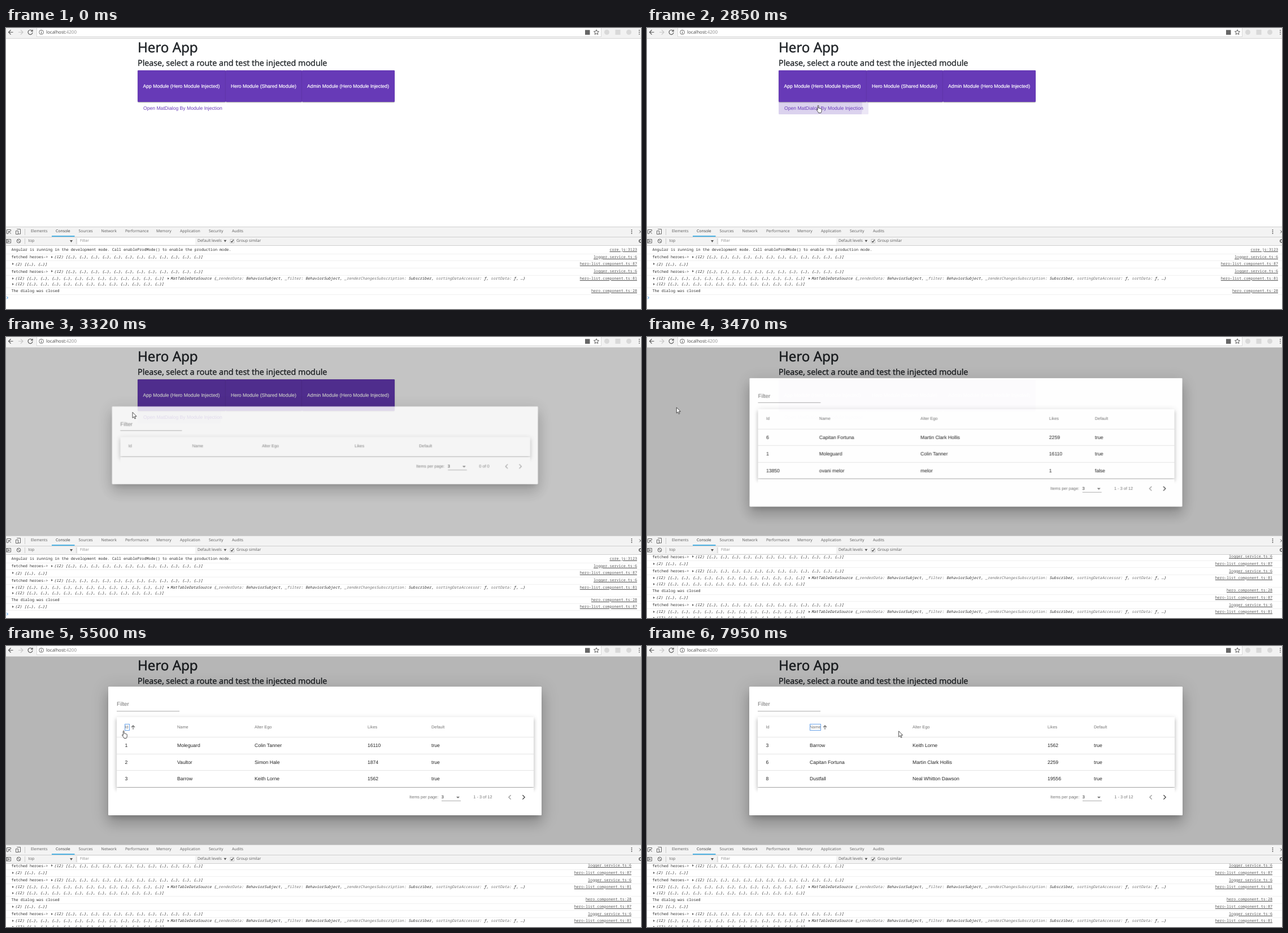
Recreate the animation shown at these times as an HTML page. Size 1124 px wide and 498 px high, loop 8000 ms.

```html
<!DOCTYPE html>
<html lang="en">
<head>
<meta charset="utf-8">
<title>Hero App</title>
<style>
  html, body { margin: 0; width: 100%; height: 100%; overflow: hidden; background: #fff; }
  #stage { position: relative; width: 1124px; height: 498px; overflow: hidden; --t: 0;
    font-family: "Liberation Sans", Arial, sans-serif; text-rendering: geometricPrecision; }
  #stage div, #stage svg { position: absolute; }
  .txt { white-space: pre; line-height: 20px; margin-top: -10px; }
  .ui { font-family: "Open Sans", "Noto Sans", sans-serif; font-size: 6.85px; color: #5a5a5a; }
  .url { font-family: "Open Sans", "Noto Sans", sans-serif; font-size: 8px; color: #444; }
  .h1, .h3 { font-family: "Open Sans", "Noto Sans", sans-serif; color: #212529; }
  .h1 { font-size: 24.2px; -webkit-text-stroke: .6px #212529; }
  .h3 { font-size: 14.33px; -webkit-text-stroke: .38px #212529; }
  .chrome { left: 0; top: 0; width: 1124px; height: 18px; background: #f2f2f2; border-bottom: 1px solid #d4d4d4; }
  .address { left: 54px; top: 0; width: 998px; height: 15px; background: #fff; border: solid #d8d8d8; border-width: 0 1px 1px; }

  #page { left: 0; top: 19px; width: 1124px; height: 333px; overflow: hidden; background: #fff; }
  #page > * { margin-top: -19px; }
  #page > .txt { margin-top: -29px; }
  .raised { top: 75px; height: 55.5px; background: #673ab7; border-radius: 1.3px;
    box-shadow: 0 1.85px .6px -1.2px rgba(0,0,0,.2), 0 1.2px 1.2px rgba(0,0,0,.14), 0 .6px 3px rgba(0,0,0,.12); }
  .raised .txt { left: 9.5px; top: 28px; font-size: 8.62px; color: #fff; -webkit-text-stroke: .2px #fff; }
  .flat { left: 233px; top: 130.5px; width: 159px; height: 22.5px; overflow: hidden; border-radius: 1.3px; }
  .flat.hover { background: rgba(103,58,183,.12); }
  .flat .txt { left: 10px; top: 11.5px; font-size: 8.62px; color: #673ab7; }
  .ripple { left: -8px; top: -70px; width: 156px; height: 156px; border-radius: 50%; background: rgba(103,58,183,.12);
    animation: grow 480ms cubic-bezier(0,0,.2,1) both paused, fade 450ms linear forwards paused;
    animation-delay: calc(2340ms - var(--t) * 1ms), calc(3180ms - var(--t) * 1ms); }
  .backdrop { left: 0; top: 19px; width: 1124px; height: 333px; background: rgba(0,0,0,.288);
    animation: show 400ms cubic-bezier(.25,.8,.25,1) both paused;
    animation-delay: calc(3185ms - var(--t) * 1ms); }
  .dialog { left: 181px; top: 71.5px; width: 767px; height: 228px; background: #fff; border-radius: 1.3px;
    box-shadow: 0 6.8px 9.2px -4.3px rgba(0,0,0,.2), 0 14.8px 23.4px 1.8px rgba(0,0,0,.14), 0 5.5px 28.3px 4.9px rgba(0,0,0,.12);
    animation: enter 400ms cubic-bezier(.25,.8,.25,1) both paused;
    animation-delay: calc(3176ms - var(--t) * 1ms); }
  .dialog.empty { top: 115.75px; height: 139.5px; }
  .label { left: 15px; top: 32.8px; font-size: 9.85px; color: rgba(0,0,0,.54); transform-origin: 0 50%; }
  .line { left: 15px; top: 42.5px; width: 110.5px; height: 1px; background: rgba(0,0,0,.32); }
  .accent { left: 15px; top: 42.3px; width: 110.5px; height: 1.3px; background: #673ab7; }
  .label, .accent { animation: var(--in) 400ms cubic-bezier(.25,.8,.25,1) both paused,
      var(--out) 400ms cubic-bezier(.25,.8,.25,1) forwards paused;
    animation-delay: calc(3820ms - var(--t) * 1ms), calc(5070ms - var(--t) * 1ms); }
  .label { --in: rise; --out: drop; }
  .accent { --in: widen; --out: fade; }
  .card { left: 15px; top: 54.5px; width: 738px; background: #fff;
    box-shadow: 0 3px 3px -2px rgba(0,0,0,.2), 0 5px 6px .6px rgba(0,0,0,.14), 0 2px 8.6px 1.2px rgba(0,0,0,.12); }
  .rule { left: 0; width: 738px; height: 1px; background: rgba(0,0,0,.1); }
  .th { font-size: 7.39px; color: rgba(0,0,0,.54); }
  .td { font-size: 8.62px; color: rgba(0,0,0,.87); }
  .pager { left: 15px; bottom: 15px; width: 738px; height: 34px; background: #fff; }
  .pager .row { right: 73.5px; top: 7px; display: flex; line-height: 20px; white-space: pre; font-size: 7.39px; color: rgba(0,0,0,.54); }
  .pager .size { position: relative; width: 33.5px; margin: 0 23px 0 5.5px; color: rgba(0,0,0,.87); }
  .pager .size i { position: absolute; left: 0; top: 16.3px; width: 34px; height: 1px; background: rgba(0,0,0,.32); }
  .pager .size b { position: absolute; right: 1px; top: 9px; border: solid transparent; border-width: 3.1px 3.1px 0; border-top-color: rgba(0,0,0,.54); }
  .focus { height: 12px; width: 19px; border: 1px solid #6ba4ea; box-sizing: border-box; }

  #console { left: 0; top: 386px; width: 1124px; height: 112px; overflow: hidden; background: #fff; }
  #log { left: 0; top: 0; width: 1124px; height: 140px; --gap: 7px; }
  #log.scrolled { top: -16.5px; --gap: 17px; }
  #log .txt { font: 6.76px/20px "Noto Sans Mono", "DejaVu Sans Mono", monospace; color: #303030; }
  #log .obj { font-style: italic; }
  #log .key { color: #707070; }
  #log .link { right: var(--gap); color: #545454; text-decoration: underline; }
  #log .sep { left: 0; width: 1124px; height: 1px; background: #f0f0f0; }
  #log .tri { border: solid transparent; border-width: 2.1px 0 2.1px 3.6px; border-left-color: #666; margin-top: -2.1px; }
  #log svg { left: 0; }

  @keyframes grow { from { transform: scale(0); } to { transform: none; } }
  @keyframes fade { from { opacity: 1; } to { opacity: 0; } }
  @keyframes show { from { opacity: 0; } to { opacity: 1; } }
  @keyframes enter { from { opacity: 0; transform: translate3d(0, 25%, 0) scale(.9); } to { opacity: 1; transform: none; } }
  @keyframes rise { from { transform: none; color: rgba(0,0,0,.54); } to { transform: translateY(-13.8px) scale(.75); color: #673ab7; } }
  @keyframes drop { from { transform: translateY(-13.8px) scale(.75); color: #673ab7; } to { transform: none; color: rgba(0,0,0,.54); } }
  @keyframes widen { from { opacity: 0; transform: scaleX(.5); } to { opacity: 1; transform: none; } }
</style>
</head>
<body>
<div id="stage">
  <div class="chrome"></div>
  <div class="address"></div>
  <div id="page">
    <div class="raised" style="left:233px;width:155.5px"><div class="txt">App Module (Hero Module Injected)</div></div>
    <div class="raised" style="left:388.5px;width:135px"><div class="txt">Hero Module (Shared Module)</div></div>
    <div class="raised" style="left:523.5px;width:164.5px"><div class="txt">Admin Module (Hero Module Injected)</div></div>
    <div class="flat" id="open"><div class="ripple"></div><div class="txt">Open MatDialog By Module Injection</div></div>
  </div>
  <div class="backdrop"></div>
  <div class="dialog" id="dialog">
    <div class="label txt">Filter</div>
    <div class="line"></div>
    <div class="accent"></div>
    <div id="tables" style="left:0;top:0"></div>
    <div class="pager">
      <div class="row"><span>Items per page:</span><span class="size">3<i></i><b></b></span><span id="range"></span></div>
      <svg style="left:0;top:0" width="738" height="34" fill="none" stroke="#000" stroke-width="1.25">
        <path d="M697.6 13.2l-3.8 3.8 3.8 3.8" opacity=".4"/>
        <path id="next" d="M718.4 13.2l3.8 3.8-3.8 3.8"/>
      </svg>
    </div>
  </div>
  <div style="left:0;top:352px;width:1124px;height:34px;background:#f3f3f3"></div>
  <div id="console"><div id="log"></div></div>
  <svg id="icons" width="1124" height="498" style="left:0;top:0" fill="none" stroke="#5a5a5a">
    <path d="M0 352.5H1124M0 370.5H1124M0 385.5H1124" stroke="#cfcfcf"/>
    <path d="M33.5 356V367M33.5 373V383M124.5 373V383" stroke="#ccc"/>
    <path d="M127 372H335V384H127Z" fill="#fff" stroke="none"/>
    <path d="M81 369H121.5" stroke="#1a9fe0" stroke-width="1.5"/>
    <path d="M12.5 7.5H5M8.5 3.5L4.5 7.5L8.5 11.5" stroke-width="1.2"/>
    <path d="M22 7.5H29.5M26 3.5L30 7.5L26 11.5" stroke="#c8c8c8" stroke-width="1.2"/>
    <path d="M46.3 5.2A4 4 0 1 0 47 8M47 3V6H44" stroke-width="1.2"/>
    <circle cx="62.5" cy="7.5" r="3.9" stroke-width=".9"/>
    <path d="M62.5 6.8V10M62.5 4.8V5.8"/>
    <path d="M1025 3.5H1033.5V12H1025Z" fill="#666" stroke="none"/>
    <path d="M1045 3l1.3 2.9 3.2.3-2.4 2.1.7 3.1-2.8-1.6-2.8 1.6.7-3.1-2.4-2.1 3.2-.3Z" stroke="#444" stroke-width=".9"/>
    <g fill="#d9d9d9" stroke="none"><circle cx="1063.5" cy="7.5" r="4.5"/><path d="M1078.5 3H1087.5V12H1078.5Z"/><circle cx="1102.5" cy="7.5" r="4.5"/></g>
    <g fill="#555" stroke="none">
      <circle cx="1121" cy="4.2" r=".9"/><circle cx="1121" cy="7.5" r=".9"/><circle cx="1121" cy="10.8" r=".9"/>
      <circle cx="1107.5" cy="358" r=".9"/><circle cx="1107.5" cy="361" r=".9"/><circle cx="1107.5" cy="364" r=".9"/>
      <path d="M113 376H118L115.5 380ZM385.5 375.7H390.3L387.9 379.5Z"/>
    </g>
    <path d="M4 364.5H1.5V357.5H8.5V360M4.5 360.5L9 364.5M4.5 360.5V364M4.5 360.5H8" stroke-width=".9"/>
    <path d="M19.5 357V356.5H25.5V365H21.5M17.5 359.5H21.5V365.5H17.5Z" stroke-width=".9"/>
    <path d="M.5 374.5H8.5V381H.5ZM2.5 374.5V381" stroke-width=".9"/>
    <path d="M4 376l3 1.8-3 1.8Z" fill="#5a5a5a" stroke="none"/>
    <circle cx="22.5" cy="377.5" r="3.3"/><path d="M20.2 375.2L24.8 379.8"/>
    <path d="M397 374.5H403.5V381H397Z" stroke="#aaa" fill="#fff" stroke-width=".7"/>
    <path d="M398.2 377.8L399.8 379.5L402.5 375.5" stroke="#333" stroke-width="1.2"/>
    <path d="M1121 358.5L1126 363.5M1126 358.5L1121 363.5"/>
    <circle cx="1123" cy="377.5" r="2.3" stroke-width="1.5"/>
  </svg>
  <svg id="cursor" width="20" height="20" overflow="visible" style="left:0;top:0" fill="#fff" stroke="#222" stroke-width=".8" stroke-linejoin="round">
    <path id="arrow" d="M.3 .3V10.4L2.6 8.3 4.2 11.9 5.8 11.2 4.2 7.6H7.4Z"/>
    <path id="hand" transform="translate(-3.2)" d="M2.3 8.4V1.2Q2.3 .3 3.2 .3Q4.1 .3 4.1 1.2V5Q5.8 4.6 5.9 5.6Q7.4 5 7.6 6.1Q9.2 5.7 9.2 7.2V9.6Q9.2 12 7.9 13.5H3.9Q3.2 11.4 .8 8.9Q-.2 7.6 .9 7.2Q1.6 7 2.3 8.4Z"/>
  </svg>
</div>
<script>
const $ = id => document.getElementById(id);
const stage = $('stage'), page = $('page'), log = $('log');

function box(parent, cls, style = {}, html = '') {
  const el = document.createElement('div');
  el.className = cls;
  for (const k in style) el.style[k] = style[k] + 'px';
  el.innerHTML = html;
  return parent.appendChild(el);
}
const text = (parent, x, y, str, cls) => box(parent, 'txt ' + cls, { left: x, top: y }, str);

// Browser, page and developer tool labels
text(stage, 71, 7.5, 'localhost:<span style="color:#888">4200</span>', 'url');
text(page, 233, 35, 'Hero App', 'h1');
text(page, 233, 63, 'Please, select a route and test the injected module', 'h3');
const tabs = { Elements: 44, Console: 88, Sources: 128.5, Network: 168.5, Performance: 211,
  Memory: 266, Application: 308, Security: 359, Audits: 400 };
for (const name in tabs) text(stage, tabs[name], 361, name, 'ui').style.color = name === 'Console' ? '#333' : '';
text(stage, 39.5, 377.5, 'top', 'ui');
text(stage, 339, 377.5, 'Default levels', 'ui');
text(stage, 408, 377.5, 'Group similar', 'ui');
stage.appendChild($('icons'));
text(stage, 131, 378, 'Filter', 'ui').style.color = '#888';
stage.appendChild($('cursor'));

// Console rows
const list = n => `(${n}) [${Array(n).fill('{…}').join(', ')}]`;
const fields = [['_renderData', 'BehaviorSubject'], ['_filter', 'BehaviorSubject'],
  ['_renderChangesSubscription', 'Subscriber'], ['sortingDataAccessor', 'ƒ'], ['sortData', 'ƒ']];
const source = 'MatTableDataSource {' +
  fields.map(([k, v]) => `<span class="key">${k}</span>: ${v}`).join(', ') + ', …}';

function entry(y, link, sepY, ...parts) {
  const row = box(log, '', { left: 0, top: 0, width: 1124 });
  for (const [x, str, plain, dy = 0] of parts) {
    if (!plain) box(row, 'tri', { left: x - 4.7, top: y + dy });
    text(row, x, y + dy, str, plain ? '' : 'obj');
  }
  box(row, 'txt link', { top: y - .3 }, link);
  box(row, 'sep', { left: 0, top: sepY });
  return row;
}
const fetched = y => entry(y, 'logger.service.ts:6', y + 6, [9.5, 'fetched heroes-&gt;', true], [85, list(12)]);
const pair = y => entry(y, 'hero-list.component.ts:87', y + 6, [16, list(2)]);
const table = y => entry(y, 'hero-list.component.ts:81', y + 16, [16, list(12)], [291, source], [16, list(12), false, 10.5]);

entry(7.3, 'core.js:3123', 13.5, [9.5, 'Angular is running in the development mode. Call enableProdMode() to enable the production mode.', true]);
fetched(20);
pair(32.5);
fetched(45.5);
table(57.8);
entry(80.2, 'hero.component.ts:28', 86, [9.5, 'The dialog was closed', true]);
const added = pair(92.3);
const late = [fetched(105.3), table(117.7)];
const prompt = box(log, '', {}, '<svg width="8" height="8" fill="none" stroke="#2b8be0"><path d="M1.2 2l2.3 2-2.3 2"/></svg>');

// Table views: start time, column x positions, rows
const heads = ['Id', 'Name', 'Alter Ego', 'Likes', 'Default'];
const fortuna = [6, 'Capitan Fortuna', 'Martin Clark Hollis', 2259, true];
const moleguard = [1, 'Moleguard', 'Colin Tanner', 16110, true];
const barrow = [3, 'Barrow', 'Keith Lorne', 1562, true];
const views = [
  { at: 0, cols: [210.5, 325.5, 451, 618, 734], rows: [] },
  { at: 3385, cols: [210.5, 304.5, 484, 712, 793],
    rows: [fortuna, moleguard, [13850, 'ovani melor', 'melor', 1, false]] },
  { at: 5180, cols: [210.5, 303, 440, 640, 753],
    rows: [moleguard, [2, 'Vaultor', 'Simon Hale', 1874, true], barrow] },
  { at: 5790, cols: [210.5, 342.5, 463.5, 634, 744],
    rows: [[13853, 'wrw,', 'qhq', 1, false], [13852, 'Shou', 'Shou Beng', 0, false], [13851, 'palecrow', 'devarika', 0, false]] },
  { at: 7105, cols: [210.5, 288, 470, 709, 791],
    rows: [barrow, fortuna, [8, 'Dustfall', 'Neal Whitton Dawson', 19556, true]] }
];
for (const v of views) {
  v.el = box($('tables'), 'card', { height: 35 + v.rows.length * 29.5 });
  heads.forEach((h, i) => text(v.el, v.cols[i] - 196, 17.8, h, 'th'));
  for (let i = 0; i <= v.rows.length; i++) box(v.el, 'rule', { top: 35 + i * 29.5 });
  v.rows.forEach((row, r) => row.forEach((cell, i) => text(v.el, v.cols[i] - 196, 50 + r * 29.5, cell, 'td')));
}

// Sort marks: from, to, header x, header width, pointing down
const marks = [[5105, 5790, 210.5, 7, 0], [5790, 6255, 210.5, 7, 1], [6945, 7105, 342.5, 19, 0], [7105, 8000, 288, 19, 0]]
  .map(([from, to, x, w, down]) => {
    const el = box($('dialog'), '', { left: x - 181, top: 66.5 }, `<div class="focus" style="left:-.5px;top:0;width:${w + 1.5}px"></div>
      <svg style="left:${w + 3.5}px;top:1.5px" width="8" height="9" fill="none" stroke="#666" stroke-width="1.1">
      <path d="M4 8V1M1 4L4 1L7 4" transform="rotate(${down * 180} 4 4.5)"/></svg>`);
    return { from, to, el };
  });

// Bursts of movement: start, end, number of steps
const bursts = [[0, 0, 1], [510, 740, 4], [1140, 1910, 11], [2380, 2850, 7], [3000, 3780, 11], [3860, 4090, 4],
  [4240, 5030, 11], [5110, 5650, 8], [5800, 5880, 2], [6260, 7030, 11], [7110, 7260, 3], [7800, 7950, 3]];
function snap(t) {
  const [a, b, n] = bursts.filter(r => r[0] <= t).pop();
  if (n === 1) return a;
  const step = (b - a) / (n - 1);
  return a + step * Math.min(n - 1, Math.floor((t - a + 6) / step));
}

// Pointer path: time, x, y
const path = [[510, 1031, 470], [587, 850, 330], [663, 695, 232], [740, 629, 199], [1063, 629, 199], [1294, 555, 160],
  [1525, 441.5, 136.3], [1680, 365, 136], [1910, 303, 137], [3240, 303, 137], [3468, 52, 124.5], [3700, 25, 99],
  [4163, 25, 99], [4400, 100, 128], [4635, 176.3, 149.5], [4850, 219, 150], [5030, 214, 150], [5110, 214, 150],
  [5650, 206, 150], [6183, 206, 150], [6414, 298.8, 148.5], [6800, 352, 147], [7030, 349, 145.3],
  [7723, 349, 145.3], [7800, 378, 147], [7875, 422, 149.5], [7950, 445.3, 150.5]];
function pointer(t) {
  const i = path.findIndex(p => p[0] > t);
  if (i < 0) return path[path.length - 1].slice(1);
  const [t0, x0, y0] = path[i - 1], [t1, x1, y1] = path[i], k = (t - t0) / (t1 - t0);
  return [x0 + (x1 - x0) * k, y0 + (y1 - y0) * k];
}

const show = (el, on) => { el.style.visibility = on ? 'visible' : 'hidden'; };

function drawPointer(t) {
  const seen = t >= path[0][0];
  const [x, y] = seen ? pointer(t) : [0, 0];
  const over = t < 3300 && x > 233 && x < 392 && y > 130 && y < 153;
  const link = over || (t > 4240 && x > 204 && x < 400);
  $('cursor').style.transform = `translate(${x}px, ${y}px)`;
  $('open').className = over ? 'flat hover' : 'flat';
  show($('hand'), seen && link);
  show($('arrow'), seen && !link);
}

function draw(t) {
  stage.style.setProperty('--t', t);
  const view = views.filter(v => v.at <= t).pop(), empty = !view.rows.length;
  for (const v of views) v.el.style.display = v === view ? '' : 'none';
  for (const m of marks) m.el.style.display = t >= m.from && t < m.to ? '' : 'none';
  $('dialog').className = empty ? 'dialog empty' : 'dialog';
  $('range').textContent = empty ? '0 of 0' : '1 - 3 of 12';
  $('next').setAttribute('opacity', empty ? .4 : .75);

  const logged = t >= 3150;
  show(added, logged);
  late.forEach(row => show(row, !empty));
  show(prompt, empty);
  prompt.style.top = (logged ? 100.5 : 88) + 'px';
  log.className = empty ? '' : 'scrolled';
  drawPointer(t);
}

function tick() {
  draw(snap(performance.now() % 8000));
  requestAnimationFrame(tick);
}
tick();
</script>
</body>
</html>
```
